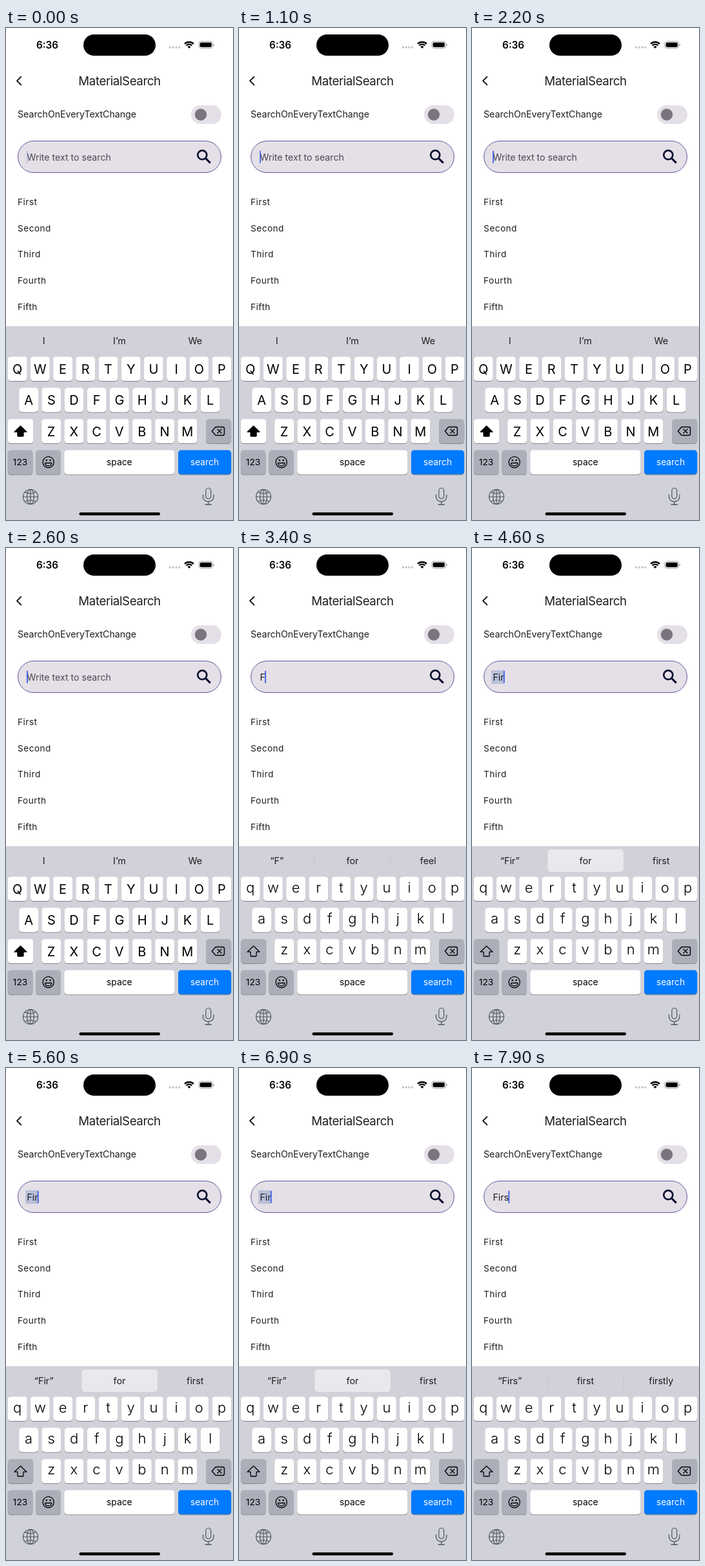
Animation, 352 px wide and 764 px high, one loop 8000 ms. Source, as an HTML page with a canvas:

```html
<!DOCTYPE html>
<html lang="en">
<head>
<meta charset="utf-8">
<title>MaterialSearch</title>
<style>
html, body { margin: 0; width: 100%; height: 100%; overflow: hidden; background: #fff; }
canvas { display: block; width: 352px; height: 764px; }
</style>
</head>
<body>
<canvas id="stage" width="352" height="764"></canvas>
<script>
const ctx = document.getElementById('stage').getContext('2d');
const LOOP = 8000, STEP = 100, TAU = Math.PI * 2;
const FONT = 'Inter, "Open Sans", sans-serif';
const PANEL = '#d1d2d9', FUNCTION_KEY = '#abafba', FIELD = '#e5dfe7';

// Each keystroke changes the field at once; the suggestions follow one step later.
const states = [
  { at: 0, text: '', words: ['I', 'I’m', 'We'] },
  { at: 3200, text: 'F', words: ['“F”', 'for', 'feel'], lines: true },
  { at: 3700, text: 'Fi', words: ['“Fi”', 'do', 'find'], correction: true },
  { at: 4400, text: 'Fir', words: ['“Fir”', 'for', 'first'], correction: true },
  { at: 7700, text: 'Firs', words: ['“Firs”', 'first', 'firstly'], lines: true }
];
const stateAt = t => states.filter(s => s.at <= t).pop() || states[0];

function label(text, x, y, size, { align = 'left', color = '#1c1b1f', weight = 400, spacing = 0 } = {}) {
  ctx.font = `${weight} ${size}px ${FONT}`;
  ctx.letterSpacing = spacing + 'px';
  ctx.textAlign = align;
  ctx.fillStyle = color;
  ctx.fillText(text, x, y);
}

function box(x, y, w, h, r, fill) {
  ctx.beginPath();
  ctx.roundRect(x, y, w, h, r);
  ctx.fillStyle = fill;
  ctx.fill();
}

function disc(x, y, r, fill) {
  ctx.beginPath();
  ctx.arc(x, y, r, 0, TAU);
  ctx.fillStyle = fill;
  ctx.fill();
}

function line(path, color, width, cap = 'round') {
  ctx.strokeStyle = color;
  ctx.lineWidth = width;
  ctx.lineCap = cap;
  ctx.lineJoin = 'round';
  ctx.stroke(new Path2D(path));
}

function statusBar() {
  label('6:36', 64, 31.5, 15.3, { align: 'center', weight: 600, color: '#000' });
  box(120, 10, 112, 33, 16.5, '#000');
  for (let i = 0; i < 4; i++) disc(254.5 + i * 4.7, 30, 1.7, '#c4c4c6');
  ctx.strokeStyle = '#000';
  ctx.lineCap = 'butt';
  for (const [r, w] of [[9.8, 2.4], [6.2, 2.3]]) {
    ctx.beginPath();
    ctx.arc(284, 31.5, r, -Math.PI * 0.75, -Math.PI * 0.25);
    ctx.lineWidth = w;
    ctx.stroke();
  }
  ctx.beginPath();
  ctx.moveTo(284, 31.8);
  ctx.arc(284, 31.8, 3.7, -Math.PI * 0.75, -Math.PI * 0.25);
  ctx.fillStyle = '#000';
  ctx.fill();
  ctx.beginPath();
  ctx.roundRect(299, 20.8, 21.5, 10.6, 3.4);
  ctx.strokeStyle = '#a0a0a2';
  ctx.lineWidth = 1;
  ctx.stroke();
  box(300.6, 22.4, 18.3, 7.4, 2, '#000');
  box(321.6, 24.4, 1.3, 3.6, 0.6, '#a0a0a2');
}

function page() {
  line('M23.3 75.8 L17 82 L23.3 88.2', '#1c1b1f', 1.9);
  label('MaterialSearch', 176, 89, 18.7, { align: 'center', spacing: -0.4 });
  label('SearchOnEveryTextChange', 18, 139.4, 14.15);
  box(287, 120, 47, 29, 14.5, FIELD);
  disc(302, 134.5, 9.2, '#79747e');
  ['First', 'Second', 'Third', 'Fourth', 'Fifth'].forEach((item, i) =>
    label(item, 18, 275 + i * 40.7, 13.6, { spacing: 0.5 }));
}

// Solid, fade out, pause, fade in: one second per blink.
function caretLevel(age) {
  const a = age % 1000;
  if (a < 500) return 1;
  if (a < 700) return 1 - (a - 500) / 200;
  return a < 850 ? 0 : (a - 850) / 150;
}

function field(t, state, corrected) {
  box(18.5, 175.5, 315, 49, 24.5, FIELD);
  ctx.strokeStyle = '#6258a0';
  ctx.lineWidth = 1;
  ctx.stroke();
  ctx.font = `400 14.15px ${FONT}`;
  ctx.letterSpacing = '0px';
  const end = 32.5 + ctx.measureText(state.text).width;
  if (corrected) box(30, 190, end - 30, 21, 1, '#b9c0d8');
  label(state.text || 'Write text to search', 32.5, 206, 14.15, { color: state.text ? '#1c1b1f' : '#4b4751' });
  ctx.globalAlpha = caretLevel(state.at ? t - state.at : t + 887);
  box(state.text ? end - 0.8 : 32, 190.5, 1.9, 19.5, 0.9, '#3f62e6');
  ctx.globalAlpha = 1;
  ctx.beginPath();
  ctx.arc(304.3, 197.2, 7, 0, TAU);
  ctx.strokeStyle = '#0b0f30';
  ctx.lineWidth = 2.7;
  ctx.stroke();
  line('M309.5 202.4 L316.8 209.7', '#0b0f30', 3.1, 'butt');
}

function suggestions(state) {
  if (state.correction) box(117.5, 468, 117.5, 35, 5, '#e8e8ed');
  if (state.lines) for (const x of [116.5, 234.5]) box(x, 475, 1, 22, 0, '#c3c4cc');
}

function key(x, y, w, fill = '#fff') {
  box(x, y + 1.1, w, 37.6, 4.6, '#8d8f96');
  box(x, y, w, 37.6, 4.6, fill);
}

function keyboard(words, lower) {
  words.forEach((word, i) => label(word, 58.7 + i * 117.3, 491, 14.3, { align: 'center' }));
  [['QWERTYUIOP', 2.8, 510.5], ['ASDFGHJKL', 20.2, 558.8], ['ZXCVBNM', 55.2, 607.2]].forEach(([row, left, y]) => {
    [...row].forEach((c, i) => {
      const x = left + i * 35.2;
      key(x, y, 29.8);
      label(lower ? c.toLowerCase() : c, x + 14.9, y + (lower ? 24 : 26.5), lower ? 22 : 20,
        { align: 'center', color: '#000', weight: lower ? 300 : 400 });
    });
  });

  key(2.8, 607.2, 39.4, lower ? FUNCTION_KEY : '#fff');
  const arrow = 'M22.5 618 L32 627.2 H27 V633.2 Q27 634 26.2 634 H18.8 Q18 634 18 633.2 V627.2 H13 Z';
  if (!lower) {
    ctx.fillStyle = '#000';
    ctx.fill(new Path2D(arrow));
  }
  line(arrow, '#000', 1.3);

  key(310, 607.2, 39.2, FUNCTION_KEY);
  line('M326 619.5 H336 Q338.5 619.5 338.5 622 V630 Q338.5 632.5 336 632.5 H326 Q325 632.5 324.3 631.7 L319.5 626 L324.3 620.3 Q325 619.5 326 619.5 Z M328 623 L334 629 M334 623 L328 629', '#000', 1.4);

  key(2.8, 655.6, 38.6, FUNCTION_KEY);
  label('123', 22, 679.2, 13.7, { align: 'center', color: '#000' });
  key(46.4, 655.6, 38.6, FUNCTION_KEY);
  ctx.beginPath();
  ctx.arc(65.7, 674.2, 8.6, 0, TAU);
  ctx.strokeStyle = '#000';
  ctx.lineWidth = 1.3;
  ctx.stroke();
  disc(62.8, 671.2, 1.3, '#000');
  disc(68.6, 671.2, 1.3, '#000');
  line('M60.5 675.5 H70.9 C70 681.5 61.4 681.5 60.5 675.5 Z', '#000', 1.3);
  key(90.2, 655.6, 171.2);
  label('space', 175.8, 678.5, 13.8, { align: 'center', color: '#000' });
  key(267, 655.6, 82.2, '#007aff');
  label('search', 308, 678.5, 13.8, { align: 'center', color: '#fff' });

  const ink = '#50535b';
  ctx.strokeStyle = ink;
  ctx.lineWidth = 1.2;
  for (const r of [11.5, 5.4]) {
    ctx.beginPath();
    ctx.ellipse(38, 728, r, 11.5, 0, 0, TAU);
    ctx.stroke();
  }
  line('M38 716.5 V739.5 M26.5 728 H49.5 M29.5 720.5 Q38 725.5 46.5 720.5 M29.5 735.5 Q38 730.5 46.5 735.5', ink, 1.2);
  ctx.beginPath();
  ctx.roundRect(309.9, 714.5, 7.8, 16.5, 3.9);
  ctx.stroke();
  line('M305.5 725 V727.5 C305.5 738 322 738 322 727.5 V725 M313.8 735.5 V740 M309 740 H318.6', ink, 1.3);
  box(113.5, 752.3, 125.5, 4.5, 2.25, '#000');
}

function draw(now) {
  const t = Math.floor((now % LOOP) / STEP) * STEP;
  const typed = stateAt(t), offered = stateAt(t - STEP);
  ctx.fillStyle = '#fff';
  ctx.fillRect(0, 0, 352, 764);
  statusBar();
  page();
  // A fresh keystroke clears the previous correction until the new one arrives.
  const settled = typed === offered;
  field(t, typed, settled && typed.correction);
  box(0, 463, 352, 301, 0, PANEL);
  if (settled || typed.lines) suggestions(typed);
  keyboard(offered.words, typed.text !== '');
}

const start = performance.now();
function tick() {
  draw(performance.now() - start);
  requestAnimationFrame(tick);
}
tick();
</script>
</body>
</html>
```
